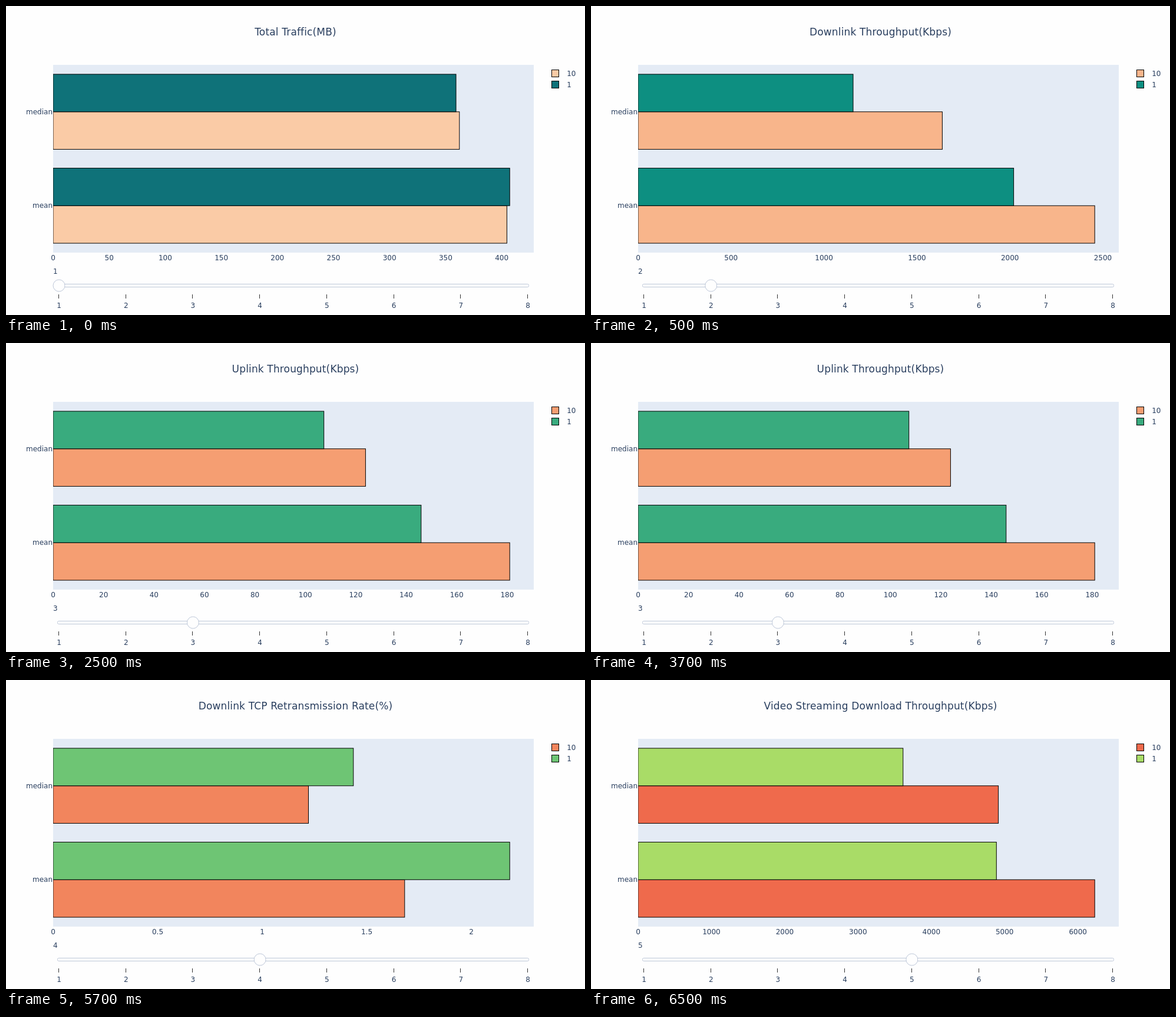
An HTML page for the animation above (8 s loop, 983x525 px).

```html
<!DOCTYPE html>
<html lang="en">
<head>
<meta charset="utf-8">
<title>Network metrics</title>
<style>
  html, body { margin: 0; width: 100%; height: 100%; overflow: hidden; background: #fefefe; }
  svg { display: block; width: 983px; height: 525px; }
  text { font: 12px Verdana, "DejaVu Sans", sans-serif; fill: #2a3f5f; white-space: pre; }
  .title { font-size: 17px; letter-spacing: .15px; }
  .bar { stroke: #000; stroke-width: 1; }
  .rail, .grip { fill: #fefefe; stroke: #bec8d9; }
</style>
</head>
<body>
<svg id="stage" viewBox="0 0 983 525">
  <clipPath id="plot"><rect x="80" y="100" width="816" height="319"/></clipPath>
</svg>
<script>
const NS = 'http://www.w3.org/2000/svg';
const stage = document.getElementById('stage');
const LEFT = 80, LOOP = 8000;

// ends: right edges of [median 10, mean 10, median 1, mean 1]
// axis: [value step, pixel step, last tick index]
const steps = [
  { at: 0, title: 'Total Traffic(MB)', colors: ['#facba6', '#0f7279'],
    ends: [769.8, 850.4, 764, 855.2], axis: [50, 95.2, 8] },
  { at: 500, title: 'Downlink Throughput(Kbps)', colors: ['#f8b58b', '#0d8f81'],
    ends: [596.4, 855.2, 445, 717.6], axis: [500, 157.8, 5] },
  { at: 2500, title: 'Uplink Throughput(Kbps)', colors: ['#f59e72', '#39ab7e'],
    ends: [610.4, 855.2, 539.7, 704.8], axis: [20, 85.65, 9] },
  { at: 4500, title: 'Downlink TCP Retransmission Rate(%)', colors: ['#f2855d', '#6ec574'],
    ends: [513.5, 855.2, 589.8, 855.2], axis: [0.5, 177.5, 4] },
  { at: 6500, title: 'Video Streaming Download Throughput(Kbps)', colors: ['#ef6a4c', '#a9dc67'],
    ends: [691.6, 855.2, 529.8, 688.3], axis: [1000, 124.45, 6] }
];
steps[3].ends[1] = 676.8;

function add(parent, tag, attrs) {
  const el = document.createElementNS(NS, tag);
  for (const key in attrs) el.setAttribute(key, attrs[key]);
  return parent.appendChild(el);
}

function label(parent, x, y, str, anchor = 'middle', cls = '') {
  const el = add(parent, 'text', { x, y, 'text-anchor': anchor, class: cls });
  el.textContent = str;
  return el;
}

const stopX = i => 90 + i * 113.71;

add(stage, 'rect', { x: LEFT, y: 100, width: 816, height: 319, fill: '#e4ebf5' });
const plot = add(stage, 'g', { 'clip-path': 'url(#plot)' });
const bars = [179.75, 339.25, 115.95, 275.45].map(y =>
  add(plot, 'rect', { x: LEFT, y, height: 63.8, class: 'bar' }));

label(stage, 79, 184, 'median', 'end');
label(stage, 79, 343, 'mean', 'end');

const swatches = ['10', '1'].map((name, i) => {
  label(stage, 952.2, 119 + 19 * i, name, 'start');
  return add(stage, 'rect', { x: 926.5, y: 108.5 + 19 * i, width: 12, height: 12, class: 'bar' });
});

const title = label(stage, 491.5, 50, '', 'middle', 'title');
const axis = add(stage, 'g', {});
const current = label(stage, LEFT, 455, '', 'start');

add(stage, 'rect', { x: 87.5, y: 472.5, width: 800, height: 5, rx: 2, class: 'rail' });
for (let i = 0; i < 8; i++) {
  add(stage, 'rect', { x: Math.floor(stopX(i) - 0.5), y: 490, width: 1, height: 7, fill: '#333' });
  label(stage, stopX(i), 513, i + 1);
}
const grip = add(stage, 'circle', { cy: 475, r: 10, class: 'grip' });

function show(index) {
  const step = steps[index];
  title.textContent = step.title;
  current.textContent = index + 1;
  grip.setAttribute('cx', stopX(index));
  bars.forEach((bar, i) => {
    bar.setAttribute('width', step.ends[i] - LEFT);
    bar.setAttribute('fill', step.colors[i >> 1]);
  });
  swatches.forEach((box, i) => box.setAttribute('fill', step.colors[i]));
  axis.replaceChildren();
  const [value, gap, last] = step.axis;
  for (let i = 0; i <= last; i++) label(axis, LEFT + i * gap, 432, i * value);
}

let shown = -1;
const start = performance.now();
function tick() {
  const t = (performance.now() - start) % LOOP;
  const index = steps.findLastIndex(step => t >= step.at);
  if (index !== shown) show(shown = index);
  requestAnimationFrame(tick);
}
tick();
</script>
</body>
</html>
```
